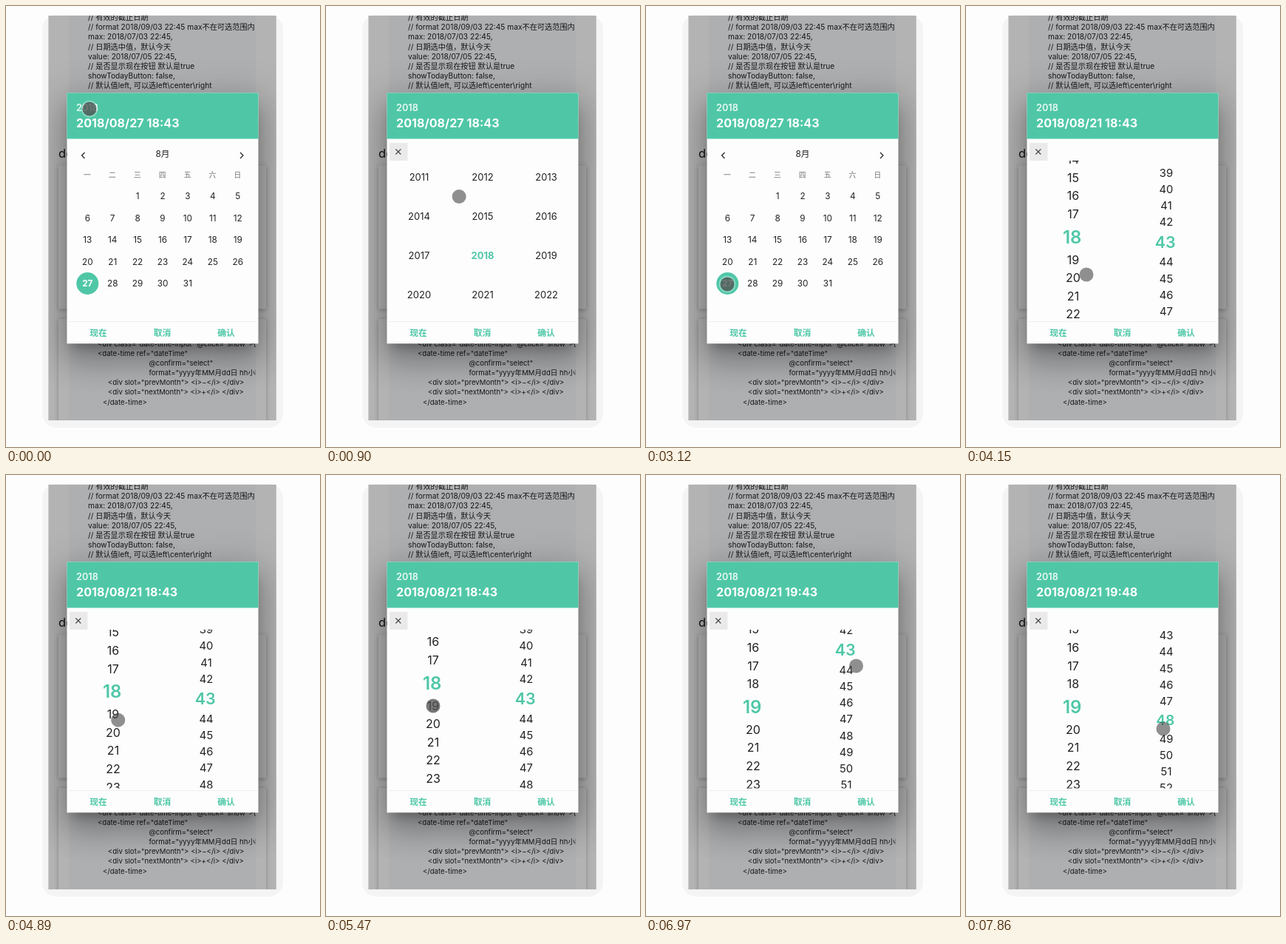
Animation, 425 px wide and 596 px high, one loop 8 s. Source, as an HTML page with a canvas:

```html
<!DOCTYPE html>
<html lang="zh">
<head>
<meta charset="utf-8">
<title>Date time picker</title>
<style>
html, body { margin: 0; width: 100%; height: 100%; overflow: hidden; background: #fdfdfd; }
canvas { display: block; }
</style>
</head>
<body>
<canvas id="stage" width="425" height="596"></canvas>
<script>
const ctx = document.getElementById('stage').getContext('2d');
const LOOP = 8000, STEPS = 54;
const TEAL = '#4fc7a7', INK = '#222', CODE_INK = '#151515', PAGE = '#b3b3b3', BLOCK = '#aeafb1';
const FONT = 'Inter, "Noto Sans CJK SC", "Noto Sans CJK", sans-serif';

// Steps at which the dialog reacts to a tap.
const YEARS_OPEN = 2, YEAR_PICKED = 13, TIME_OPEN = 26, HOUR_PICKED = 41, MINUTE_PICKED = 53;

// Cursor moves: each leaves at one step and arrives at another.
const MOVES = [
  { leave: 0, arrive: 0, x: 113, y: 139, tap: true },
  { leave: 1, arrive: 8, x: 207, y: 305 },
  { leave: 8, arrive: 11, x: 222, y: 330, tap: true },
  { leave: 13, arrive: 17, x: 102, y: 379 },
  { leave: 18, arrive: 20, x: 110, y: 376, tap: true },
  { leave: 21, arrive: 24, x: 150, y: 351, tap: true },
  { leave: 26, arrive: 28, x: 163, y: 363 },
  { leave: 28, arrive: 36, x: 145, y: 312, tap: true },
  { leave: 40, arrive: 47, x: 284.5, y: 258 },
  { leave: 47, arrive: 51, x: 267, y: 343, tap: true }
];

const TOP_CODE = `// 有效的截止日期
// format 2018/09/03 22:45 max不在可选范围内
max: 2018/07/03 22:45,
// 日期选中值，默认今天
value: 2018/07/05 22:45,
// 是否显示现在按钮 默认是true
showTodayButton: false,
// 默认值left, 可以选left\\center\\right`;

const LOW_CODE = ` <div class="date-time-input" @click="show">{{
 <date-time ref="dateTime"
           @confirm="select"
           format="yyyy年MM月dd日 hh小时"
   <div slot="prevMonth"> <i>−</i> </div>
   <div slot="nextMonth"> <i>+</i> </div>
  </date-time>`;

const ramp = (k, a, b) => Math.min(1, Math.max(0, (k - a) / (b - a || 1)));

// Height of the rows 18 and 43 as the wheels settle and are dragged.
const hourY = k => 335 - 23 * ramp(k, 26, 28) - 31 * ramp(k, 28, 36) + 7.6 * ramp(k, 40, 43);
const minuteY = k => 344 - 25 * ramp(k, 26, 28) - 16.5 * ramp(k, 28, 31)
  - 66 * ramp(k, 43, 47) - 16.5 * ramp(k, 47, 51);

function rect(x, y, w, h, color, r = 0) {
  ctx.fillStyle = color;
  ctx.beginPath();
  ctx.roundRect(x, y, w, h, r);
  ctx.fill();
}

function disc(x, y, r, color) {
  ctx.fillStyle = color;
  ctx.beginPath();
  ctx.arc(x, y, r, 0, Math.PI * 2);
  ctx.fill();
}

function line(points, color, width) {
  ctx.strokeStyle = color;
  ctx.lineWidth = width;
  ctx.beginPath();
  points.forEach(([x, y]) => ctx.lineTo(x, y));
  ctx.stroke();
}

// y is the middle of the digits.
function text(s, x, y, size, color = INK, weight = 400, align = 'center') {
  ctx.font = `${weight} ${size}px ${FONT}`;
  ctx.textAlign = align;
  ctx.fillStyle = color;
  ctx.fillText(s, x, y + size * 0.363);
}

function code(source, x, y, size, indent) {
  source.split('\n').forEach((s, i) => {
    const depth = s.search(/\S/);
    text(s.trim(), x + depth * indent, y + i * 13.1, size, CODE_INK, 400, 'left');
  });
}

// Casts only the shadow; the box itself stays off stage.
function shadow(x, y, w, h, dy, blur, spread, alpha) {
  const away = 2000;
  ctx.save();
  ctx.shadowColor = `rgba(0,0,0,${alpha})`;
  ctx.shadowBlur = blur;
  ctx.shadowOffsetX = away;
  ctx.shadowOffsetY = dy;
  rect(x - away - spread, y - spread, w + 2 * spread, h + 2 * spread, '#000');
  ctx.restore();
}

function clipped(x, y, w, h, paint) {
  ctx.save();
  ctx.beginPath();
  ctx.rect(x, y, w, h);
  ctx.clip();
  paint();
  ctx.restore();
}

function card(y, h) {
  shadow(71, y, 281, h, 1, 6, 0, 0.25);
  rect(71, y, 281, h, PAGE, 2);
}

function drawPage() {
  rect(0, 0, 425, 596, '#fdfdfd');
  rect(49, 12, 326, 558, '#f4f4f4', 20);
  clipped(57.4, 13, 308.4, 547, () => {
    rect(57, 13, 310, 547, PAGE);
    card(215.5, 194);
    card(423, 160);
    rect(85, 13, 253, 118, BLOCK);
    rect(85, 437, 253, 123, BLOCK);
    text('demo', 71, 199.5, 16.5, '#111', 400, 'left');
    code(TOP_CODE, 111, 15.5, 10.2, 0);
    clipped(85, 437, 253, 123, () => code(LOW_CODE, 117, 456.5, 9.6, 6.95));
    shadow(82.5, 118, 259, 338, 11, 15, -7, 0.27);
    shadow(82.5, 118, 259, 338, 24, 38, 3, 0.2);
    shadow(82.5, 118, 259, 338, 9, 46, 8, 0.17);
  });
}

function drawDialog(date) {
  rect(82.5, 117.6, 259, 338.7, '#fdfdfd');
  rect(82.5, 117.6, 259, 62, TEAL);
  text('2018', 95, 137.3, 12.7, 'rgba(255,255,255,.88)', 600, 'left');
  text(date, 95, 157.8, 16.1, '#fff', 700, 'left');
  rect(82.5, 426, 259, 1, '#f0f0f0');
  ['现在', '取消', '确认'].forEach((s, i) => text(s, 125 + i * 86.5, 441.4, 11.8, TEAL, 700));
}

function drawCalendar() {
  for (const [x, dir] of [[102.5, 1], [321, -1]]) {
    line([[x + 4 * dir, 198], [x, 202], [x + 4 * dir, 206]], INK, 1.2);
  }
  text('8月', 212, 200, 11.8);
  [...'一二三四五六日'].forEach((s, i) => text(s, 110 + i * 33.9, 228.5, 9.8, '#a0a0a0', 700));
  for (let day = 1; day <= 31; day++) {
    const cell = day + 1, x = 110.3 + cell % 7 * 33.9, y = 257 + Math.floor(cell / 7) * 29.5;
    const chosen = day === 27;
    if (chosen) disc(x, y, 15, TEAL);
    text(day, x, y, 11.8, chosen ? '#fff' : INK, chosen ? 700 : 400);
  }
}

function drawClose() {
  const x = 97.8, y = 197, r = 3.5;
  rect(86, 185, 24.5, 24, '#eaeaea');
  line([[x - r, y - r], [x + r, y + r]], '#444', 1.1);
  line([[x + r, y - r], [x - r, y + r]], '#444', 1.1);
}

function drawYears() {
  drawClose();
  for (let i = 0; i < 12; i++) {
    const year = 2011 + i, chosen = year === 2018;
    text(year, 126 + i % 3 * 86, 231 + Math.floor(i / 3) * 53, 13, chosen ? TEAL : INK, chosen ? 700 : 400);
  }
}

function drawWheel({ x, count, first, y, row, gap, size, big, chosen, grow }) {
  for (let n = 0; n < count; n++) {
    const cy = y + (n - first) * row + Math.sign(n - chosen) * gap * grow;
    if (cy < 190 || cy > 440) continue;
    const s = String(n).padStart(2, '0');
    if (n === chosen) text(s, x - 1.3, cy, size + (big - size) * grow, TEAL, 600);
    else text(s, x, cy, size);
  }
}

function drawTime(k, hour, minute) {
  // A newly picked row takes two steps to reach its full size.
  const grow = (from, picked) => picked ? ramp(k, from - 2, from + 1) : 1;
  drawClose();
  clipped(83, 209, 258, 214.5, () => {
    drawWheel({
      x: 145, count: 24, first: 18, y: hourY(k), row: 24.6, gap: 6.2,
      size: 16, big: 24, chosen: hour, grow: grow(HOUR_PICKED, hour === 19)
    });
    drawWheel({
      x: 271, count: 60, first: 43, y: minuteY(k), row: 22.2, gap: 4.8,
      size: 14.8, big: 21.5, chosen: minute, grow: grow(MINUTE_PICKED, minute === 48)
    });
  });
}

function drawCursor(k) {
  let { x, y } = MOVES[0], pressed = false;
  for (const move of MOVES) {
    const p = ramp(k, move.leave, move.arrive);
    x += (move.x - x) * p;
    y += (move.y - y) * p;
    const since = k - move.arrive;
    if (move.tap && since >= 0 && since < 2) pressed = true;
  }
  if (pressed) disc(x, y, 11.3, 'rgba(255,255,255,.35)');
  disc(x, y, 9.5, pressed ? 'rgba(50,50,50,.66)' : 'rgba(70,70,70,.6)');
}

function draw(k) {
  const timeView = k >= TIME_OPEN;
  const hour = k >= HOUR_PICKED ? 19 : 18, minute = k >= MINUTE_PICKED ? 48 : 43;
  drawPage();
  drawDialog(`2018/08/${timeView ? 21 : 27} ${hour}:${minute}`);
  if (timeView) drawTime(k, hour, minute);
  else if (k >= YEARS_OPEN && k < YEAR_PICKED) drawYears();
  else drawCalendar();
  drawCursor(k);
}

let shown = -1;
const start = performance.now();
function tick() {
  const t = (performance.now() - start) % LOOP;
  const k = Math.min(STEPS - 1, Math.floor((t + 12) / LOOP * STEPS));
  if (k !== shown) draw(shown = k);
  requestAnimationFrame(tick);
}
tick();
</script>
</body>
</html>
```
